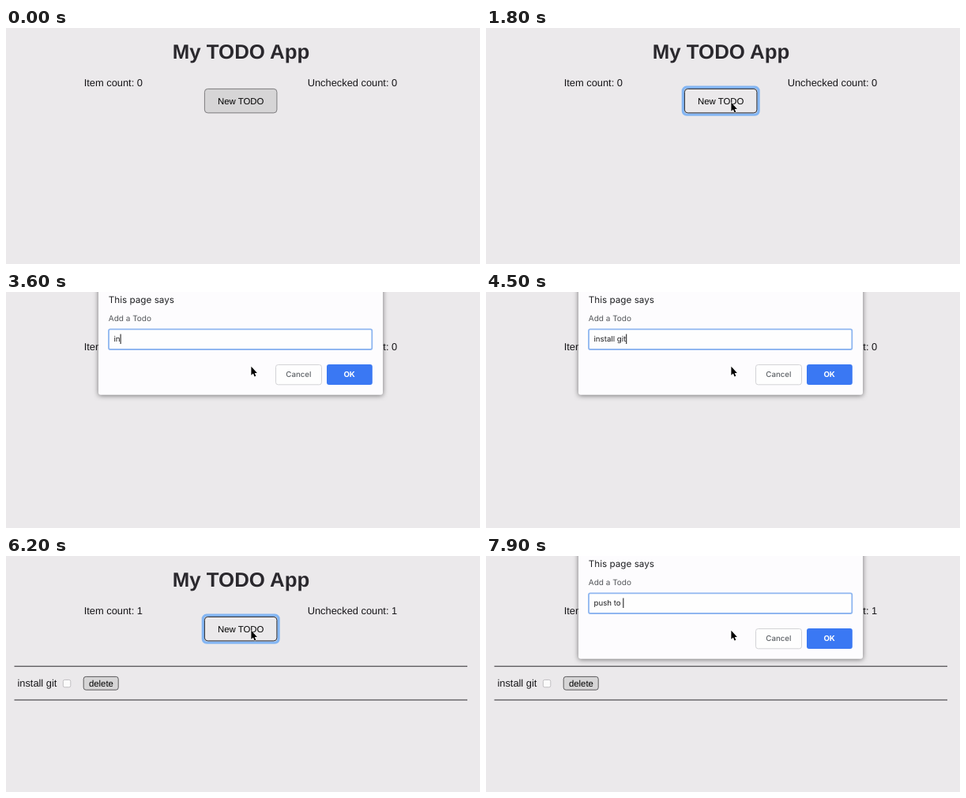
An HTML page for the animation above (8 s loop, 600 by 300 pixels).

```html
<!DOCTYPE html>
<html lang="en">
<head>
<meta charset="utf-8">
<title>My TODO App</title>
<style>
  html, body { margin: 0; width: 100%; height: 100%; overflow: hidden; background: #ebe9eb; }
  #stage { position: fixed; inset: 0; overflow: hidden; contain: strict; }
  svg { position: absolute; left: 0; top: 0; width: 100%; height: 100%; display: block; }
  text { text-rendering: geometricPrecision; }
  .page { font-family: "Liberation Sans", Arial, sans-serif; font-size: 12.85px; fill: #161518; }
  .title { font-size: 25.8px; font-weight: 700; fill: #2a282d; }
  .small { font-size: 11.4px; fill: #000; }
  .mid { text-anchor: middle; }
  #dialog {
    font-family: Inter, "Open Sans", sans-serif;
    font-size: 9.7px;
    transform-origin: 297px 131px;
  }
  #sheet { filter: drop-shadow(0 1px 3px rgba(0, 0, 0, .5)); }
</style>
</head>
<body>
<div id="stage">
<svg class="page" viewBox="0 0 600 300">
  <text class="title mid" x="297.5" y="38.8">My TODO App</text>
  <text id="items" x="98.7" y="74"></text>
  <text id="unchecked" x="381.7" y="74"></text>
  <rect id="ring" x="249.4" y="75.3" width="95.6" height="34.8" rx="4.5" fill="none" stroke="#84b6f3" stroke-width="3.4"/>
  <rect id="button" x="251.4" y="77.4" width="91.5" height="30.5" rx="4"/>
  <text class="small mid" x="297.2" y="97">New TODO</text>
  <g id="row">
    <path d="M10.5 140.2H584M10.5 183H584" stroke="#29272b"/>
    <text x="14.4" y="166">install git</text>
    <rect x="72.3" y="157.4" width="9.5" height="9.4" rx="2" fill="#fbfbfb" stroke="#c0bec1"/>
    <rect x="98.2" y="153.4" width="44" height="16.8" rx="3" fill="#d6d5d6" stroke="#5a595b"/>
    <text class="small" x="104.9" y="165.9">delete</text>
  </g>
</svg>

<svg id="dialog" viewBox="0 0 600 300" overflow="visible">
  <rect id="sheet" x="117" y="-60" width="360" height="190.7" rx="3" fill="#fdfcfe"/>
  <text x="129.8" y="13.5" font-size="11.7" fill="#202124">This page says</text>
  <text x="129.8" y="36.8" font-size="10" fill="#55575b">Add a Todo</text>
  <rect id="field" x="130" y="47.3" width="333.3" height="25.7" rx="2" fill="#fefefe" stroke-width="1.8"/>
  <text id="entry" x="136.5" y="63.3" fill="#1c1c1e" xml:space="preserve"></text>
  <rect id="caret" y="53.5" width="1" height="12.5" fill="#111"/>
  <rect x="341.5" y="92.5" width="58" height="25.3" rx="3" fill="#fefefe" stroke="#d3d3d6"/>
  <text class="mid" x="370.4" y="108.3" font-weight="500" fill="#5f6368">Cancel</text>
  <rect x="406" y="92" width="57.8" height="26" rx="3" fill="#3a78f3"/>
  <text class="mid" x="434.6" y="108.3" font-weight="700" fill="#fff">OK</text>
</svg>

<svg viewBox="0 0 600 300">
  <path id="cursor" d="M0 0V11L2.5 8.7L4.2 12.7L5.9 12L4.3 8.1H7.5Z" fill="#000" stroke="#fff" stroke-width=".9" stroke-linejoin="round" paint-order="stroke"/>
</svg>
</div>

<script>
const LOOP = 8000, STEP = 100;
const $ = id => document.getElementById(id);
const within = (t, a, b) => t >= a && t < b;
const show = (id, on) => { $(id).style.display = on ? "" : "none"; };

// [time, value] lists; the last entry already reached applies
const typing = [
  [0, ""], [3500, "i"], [3600, "in"], [3700, "inst"], [3800, "insta"], [3900, "install"],
  [4100, "install "], [4200, "install g"], [4400, "install gi"], [4500, "install git"],
  [5000, ""], [7000, "pu"], [7100, "pus"], [7200, "push "], [7300, "push t"],
  [7600, "push to"], [7900, "push to "]
];
// dialog state: [opacity, fold]
const sheetStates = [
  [0, [0, 1]], [1900, [.55, .5]], [2000, [1, 0]],
  [4600, [.65, .45]], [4700, [.21, 1]], [4800, [.06, 1.3]], [4900, [0, 1.4]],
  [6300, [.55, .5]], [6400, [1, 0]]
];
const at = (list, t) => list.filter(k => k[0] <= t).pop()[1];

// the top edge leans away while the sheet slides up
function fold(p) {
  return `matrix3d(1,0,0,0, 0,${1 + .07 * p},0,${-.00038 * p}, 0,0,1,0, 0,${-12.6 * p},0,${1 + .005 * p})`;
}

function moveCursor(t) {
  const u = Math.min(1, Math.max(0, (t - 300) / 700));
  const left = (1 - u) ** 3;
  const x = 310.4 + 98 * left, y = 94.8 + 165 * left;
  $("cursor").setAttribute("transform", `translate(${x} ${y})`);
  show("cursor", t >= 300);
  return t >= 300 && x > 251 && x < 343 && y < 108;
}

function draw(t) {
  const hover = moveCursor(t);
  $("button").setAttribute("fill", hover ? "#ebe9eb" : "#d6d5d6");
  $("button").setAttribute("stroke", hover ? "#252428" : "#7b7a7c");
  show("ring", within(t, 1700, 4600) || t >= 5200);

  const added = t >= 4600;
  $("items").textContent = "Item count: " + (added ? 1 : 0);
  $("unchecked").textContent = "Unchecked count: " + (added ? 1 : 0);
  show("row", added);

  const [opacity, p] = at(sheetStates, t);
  const closing = within(t, 4600, 5000);
  show("dialog", opacity > 0);
  $("dialog").style.opacity = opacity;
  $("dialog").style.transform = fold(p);
  $("field").setAttribute("stroke", closing ? "#dcdce0" : "#8fb6f0");

  const text = at(typing, t);
  $("entry").textContent = text;
  const end = text && opacity ? $("entry").getComputedTextLength() : 0;
  $("caret").setAttribute("x", 136.5 + end);
  show("caret", !closing && !within(t, 2500, 3000) && !within(t, 6800, 7000));
}

function tick() {
  const t = performance.now() % LOOP;
  draw(Math.floor(t / STEP) * STEP);
  requestAnimationFrame(tick);
}
tick();
</script>
</body>
</html>
```
